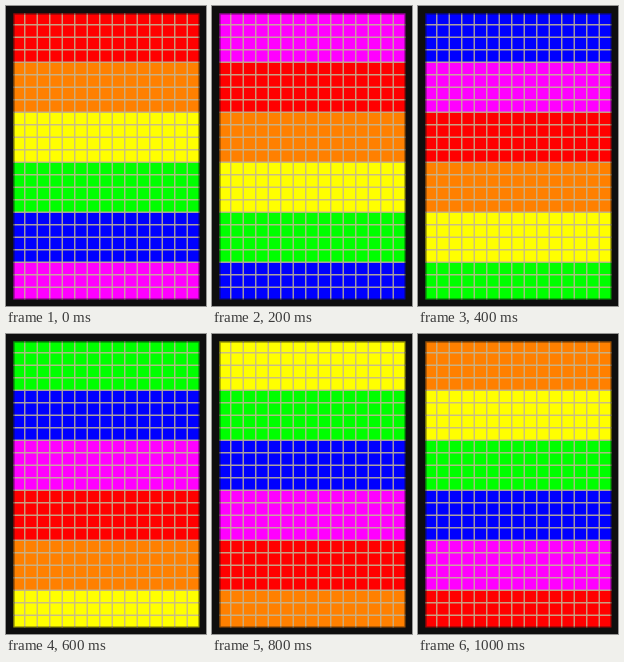
These frames come from a looping animation (200x300 px, 1.2 s). An HTML page:

```html
<!DOCTYPE html>
<html lang="en">
<head>
<meta charset="utf-8">
<title>Rainbow grid</title>
<style>
html, body { margin: 0; width: 100%; height: 100%; overflow: hidden; background: #0e0e0e; }
svg { display: block; width: 200px; height: 300px; }
</style>
</head>
<body>
<svg id="stage" viewBox="0 0 200 300">
  <rect width="200" height="300" fill="#0e0e0e"/>
  <g id="bands"></g>
  <path id="grid" fill="none" stroke="#c2b594" stroke-opacity=".88" stroke-width="1.4"/>
  <rect x="7.9" y="7.9" width="185.2" height="285.2" fill="none" stroke="#0e0e0e" stroke-opacity=".45" stroke-width="1.6"/>
</svg>
<script>
const COLORS = ['#ff0000', '#ff8000', '#ffff00', '#00ff00', '#0000ff', '#ff00ff'];
const STEP = 200;
const CELL = 12.5, OFFSET = 6.25;
const LEFT = 7.3, TOP = 7.3, RIGHT = 193.5, BOTTOM = 293.5;
const BAND = CELL * 4;

const group = document.getElementById('bands');
const bands = COLORS.map((_, i) => {
  const rect = document.createElementNS('http://www.w3.org/2000/svg', 'rect');
  const top = Math.max(TOP, OFFSET + i * BAND);
  const bottom = Math.min(BOTTOM, OFFSET + (i + 1) * BAND);
  const box = { x: LEFT, y: top, width: RIGHT - LEFT, height: bottom - top };
  for (const key in box) rect.setAttribute(key, box[key]);
  return group.appendChild(rect);
});

let path = '';
for (let x = OFFSET + CELL; x < RIGHT; x += CELL) path += `M${x} ${TOP}V${BOTTOM}`;
for (let y = OFFSET + CELL; y < BOTTOM; y += CELL) path += `M${LEFT} ${y}H${RIGHT}`;
document.getElementById('grid').setAttribute('d', path);

// Each step moves every colour one band down.
function draw(time) {
  const count = COLORS.length;
  const shift = Math.floor(time / STEP) % count;
  bands.forEach((band, i) => band.setAttribute('fill', COLORS[(i - shift + count) % count]));
}

const start = performance.now();
function tick(now) {
  draw(Math.max(0, now - start));
  requestAnimationFrame(tick);
}
draw(0);
requestAnimationFrame(tick);
</script>
</body>
</html>
```
